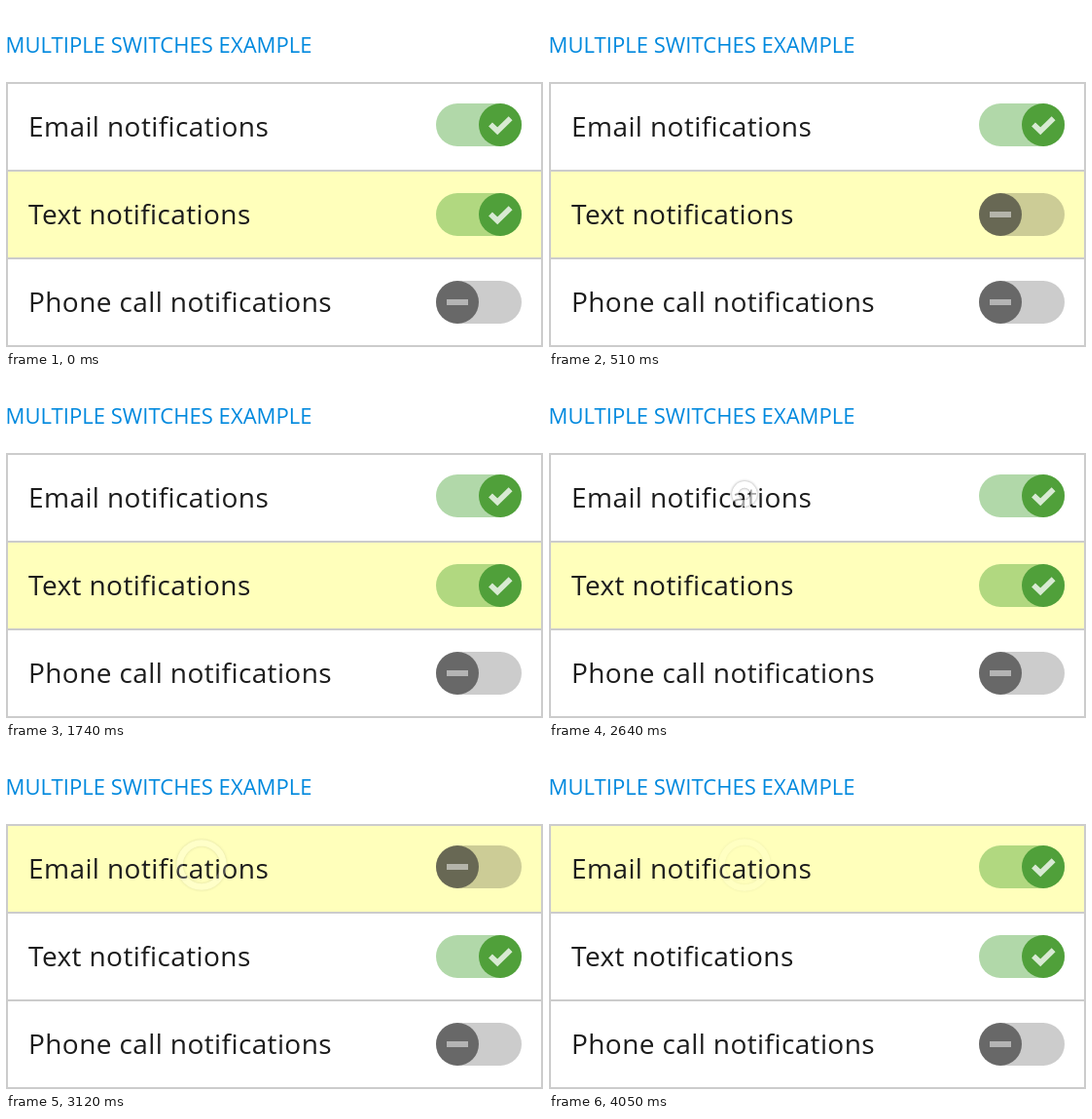
An HTML page for the animation above (4.98 s loop, 552 by 352 pixels).

```html
<!DOCTYPE html>
<html lang="en">
<head>
<meta charset="utf-8">
<title>Multiple switches</title>
<style>
  html, body { margin: 0; width: 100%; height: 100%; overflow: hidden; background: #fff; }
  svg { display: block; width: 552px; height: 352px; }
  text { font-family: "Open Sans", "Noto Sans", sans-serif; }
  .title { font-size: 22px; letter-spacing: .05px; fill: #0089de; }
  .label { font-size: 28px; letter-spacing: .4px; fill: #1c1c1c; }
  .ring { fill: none; stroke: #fff; stroke-width: 6.6; filter: drop-shadow(0 0 1.5px rgba(0, 0, 0, .65)); }
</style>
</head>
<body>
<svg id="stage" viewBox="0 0 552 352">
  <rect width="552" height="352" fill="#fff"/>
  <text class="title" x="-0.5" y="48">MULTIPLE SWITCHES EXAMPLE</text>
</svg>
<script>
const LOOP = 4980, STEP = 30, SLIDE = 200, RIPPLE = 420;
const HIGHLIGHT_MOVE = 2760;

// Colours as r, g, b, alpha for the off and on states
const TRACK = [[0, 0, 0, .2], [60, 157, 40, .4]];
const PADDLE = [[45, 45, 45, .62], [80, 160, 58, 1]];

const ROWS = [
  { label: "Email notifications", y: 80, switchY: 122, on: true, toggles: [2790, 3660] },
  { label: "Text notifications", y: 170, switchY: 214, on: true, toggles: [90, 1320] },
  { label: "Phone call notifications", y: 260, switchY: 304, on: false, toggles: [] }
];

const CLICKS = [
  { x: 477, y: 207, press: 60, release: 90 },
  { x: 476.5, y: 207, press: 1170, release: 1320 },
  { x: 201, y: 120, press: 2640, release: 2760 },
  { x: 201, y: 120, press: 3570, release: 3660 }
];

const stage = document.getElementById("stage");

function set(node, attrs) {
  for (const key in attrs) node.setAttribute(key, attrs[key]);
}

function add(parent, tag, attrs) {
  const node = document.createElementNS("http://www.w3.org/2000/svg", tag);
  set(node, attrs);
  return parent.appendChild(node);
}

const clamp = v => Math.max(0, Math.min(1, v));

function mix([from, to], k) {
  const c = from.map((v, i) => v + (to[i] - v) * k);
  return `rgba(${c.slice(0, 3).map(Math.round).join(",")},${c[3].toFixed(3)})`;
}

// The CSS "ease" curve, cubic-bezier(.25, .1, .25, 1)
function ease(x) {
  const bezier = (a, b, s) => 3 * a * s * (1 - s) ** 2 + 3 * b * s * s * (1 - s) + s ** 3;
  let lo = 0, hi = 1;
  for (let i = 0; i < 24; i++) {
    const mid = (lo + hi) / 2;
    if (bezier(.25, .25, mid) < x) lo = mid; else hi = mid;
  }
  return bezier(.1, 1, hi);
}

for (const row of ROWS) {
  row.back = add(stage, "rect", { x: 1, y: row.y - 1, width: 550, height: 90, stroke: "#ccc", "stroke-width": 2 });
  add(stage, "text", { class: "label", x: 23, y: row.y + 54 }).textContent = row.label;
  row.track = add(stage, "rect", { x: 442, y: row.switchY - 22, width: 88, height: 44, rx: 22 });
  row.knob = add(stage, "g", {});
  row.paddle = add(row.knob, "circle", { r: 22 });
  row.minus = add(row.knob, "rect", { x: -11, y: -3, width: 22, height: 6, fill: "#fff", "fill-opacity": .5 });
  row.check = add(row.knob, "path", {
    d: "M-10-.6L-2.8 6.3L10.6-6.7", fill: "none", stroke: "#fff", "stroke-width": 5.6, "stroke-opacity": .78
  });
}

for (const click of CLICKS) {
  click.ring = add(stage, "circle", { class: "ring", cx: click.x, cy: click.y });
}

function drawRow(row, t, lit) {
  let on = row.on, k = on ? 1 : 0;
  for (const start of row.toggles) {
    if (t < start) break;
    on = !on;
    const p = ease(clamp((t - start) / SLIDE));
    k = on ? p : 1 - p;
  }
  set(row.back, { fill: lit ? "#ffffbb" : "#fff" });
  set(row.track, { fill: mix(TRACK, k) });
  set(row.paddle, { fill: mix(PADDLE, k) });
  set(row.knob, { transform: `translate(${464 + 44 * k} ${row.switchY})` });
  set(row.check, { visibility: on ? "visible" : "hidden" });
  set(row.minus, { visibility: on ? "hidden" : "visible" });
}

function drawClick({ ring, press, release }, t) {
  const shown = t >= press && t < release + RIPPLE;
  const p = clamp((t - release) / RIPPLE);
  set(ring, {
    visibility: shown ? "visible" : "hidden",
    r: 9.6 + 15 * p,
    opacity: Math.min(1, .6 + p * 5) * Math.min(1, (1 - p) / .7)
  });
}

function draw(t) {
  const litRow = t < HIGHLIGHT_MOVE ? 1 : 0;
  ROWS.forEach((row, i) => drawRow(row, t, i === litRow));
  CLICKS.forEach(click => drawClick(click, t));
}

const began = performance.now();
function tick() {
  const t = (performance.now() - began) % LOOP;
  draw(Math.floor(t / STEP) * STEP);
  requestAnimationFrame(tick);
}
draw(0);
requestAnimationFrame(tick);
</script>
</body>
</html>
```
